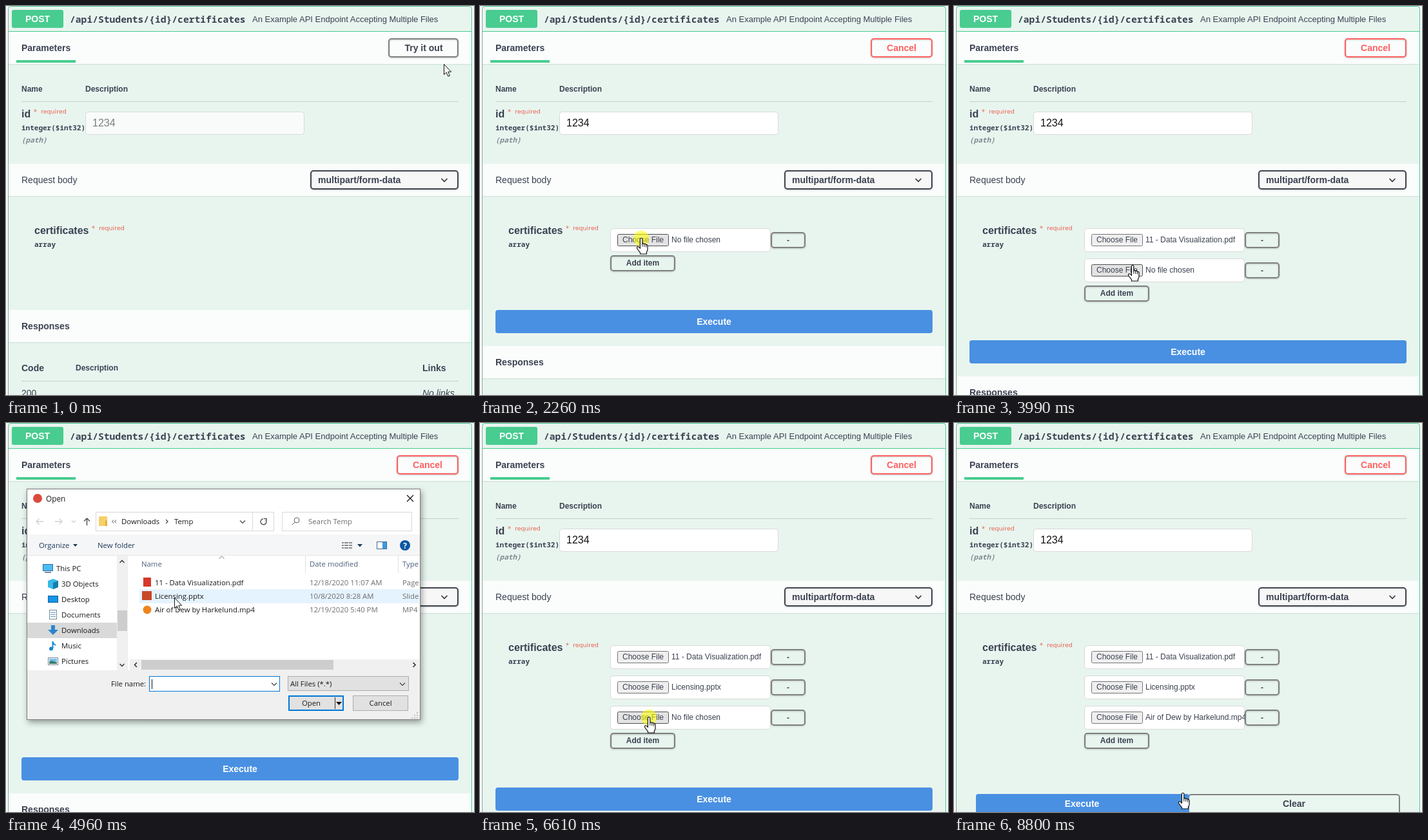
An HTML page that plays this animation: 726x604 px, repeating every 9.12 s.

```html
<!DOCTYPE html>
<html lang="en">
<head>
<meta charset="utf-8">
<title>Uploading several files</title>
<style>
html, body { margin: 0; width: 100%; height: 100%; overflow: hidden; background: #fbfbfb; }
svg { display: block; width: 726px; height: 604px; }
text { font-family: "Liberation Sans", Arial, sans-serif; fill: #3b4151; white-space: pre; }
.b { font-weight: 700; }
.i { font-style: italic; }
.mid { text-anchor: middle; }
.mono { font-family: "Noto Sans Mono", monospace; font-weight: 600; }
.req { font-family: "DejaVu Sans", sans-serif; fill: #e9614f; }
.white { fill: #fff; }
.red { fill: #ff6060; }
#dialog text { font-family: "Open Sans", "Noto Sans", sans-serif; fill: #1a1a1a; }
#dialog text.dim { fill: #6d6d6d; }
#dialog text.head { fill: #4c607a; }
#dialog text.tool { fill: #1e395b; }
.glow { filter: drop-shadow(0 0 2.5px rgba(0,0,0,.45)); }
.soft { filter: drop-shadow(0 1px 1px rgba(0,0,0,.2)); }
</style>
</head>
<body>
<svg viewBox="0 0 726 604" xmlns="http://www.w3.org/2000/svg">
  <g id="page"></g>
  <g id="dialog">
    <g id="frame" style="filter:drop-shadow(2px 4px 5px rgba(0,0,0,.38))"></g>
  </g>
  <circle id="click" r="12.3" fill="#ffff00" opacity=".56"/>
  <g id="arrow">
    <path d="M.5.5V16.5L4.2 13.1 6.9 19.3 9.4 18.2 6.8 12.2H11.6Z" fill="#fff" stroke="#111"/>
  </g>
  <g id="hand">
    <path d="M-1.6 1.2Q-1.6-.5 .1-.5T1.8 1.2V8Q3.6 6.8 4.8 8.6Q6.6 7.6 7.6 9.6Q10 9 10 11.5V17Q10 19.5 8.4 21V24H-1.5V22L-6 16Q-7.2 13.6-5.6 12.8Q-4 12.4-1.6 15Z" fill="#fff" stroke="#111" stroke-width="1.2"/>
    <path d="M1.8 8V12.5M4.8 9V13M7.6 10V13.5" fill="none" stroke="#111"/>
  </g>
</svg>
<script>
const LOOP = 9120;
const FILES = ["11 - Data Visualization.pdf", "Licensing.pptx", "Air of Dew by Harkelund.mp4"];
const $ = id => document.getElementById(id);

// Pointer path: time, x, y
const PATH = [
  [0, 679, 90], [60, 679, 90], [380, 650, 66], [1000, 650, 66], [1400, 225, 350],
  [1700, 225, 350], [2200, 250, 361], [2560, 250, 361], [2960, 280, 263], [3110, 268, 248],
  [3380, 268, 248], [3620, 250, 400], [3780, 250, 400], [3970, 277, 403], [4600, 277, 403],
  [5000, 261, 267], [5680, 261, 267], [6050, 258, 446], [6300, 258, 446], [6560, 262, 457],
  [6780, 262, 457], [7090, 265, 291], [7190, 265, 292], [7520, 265, 292], [8230, 355, 575]
];
const CLICKS = [[450, 600], [1430, 1640], [2260, 2540], [3120, 3360], [3640, 3760], [4310, 4500],
  [5330, 5700], [6070, 6270], [6600, 6720], [7350, 7500], [8350, 8700]];
const DIALOGS = [[2510, 3280], [4470, 5430], [6700, 7350]];
const ADDED = [1660, 3740, 6290];
const PICKED = [3440, 5740, 7560];
const TRIED = 540, SENT = 8520;

const clamp = v => Math.max(0, Math.min(1, v));
const ease = v => v * v * (3 - 2 * v);
const count = (times, t) => times.filter(s => t >= s).length;
const within = (spans, t) => spans.some(([a, b]) => t >= a && t < b);

function text(x, y, str, size, cls = "") {
  return `<text x="${x}" y="${y}" font-size="${size}" class="${cls}">${str}</text>`;
}
function rect(x, y, w, h, fill, more = "") {
  return `<rect x="${x}" y="${y}" width="${w}" height="${h}" fill="${fill}" ${more}/>`;
}
function boxed(x, y, w, h, fill, stroke, sw = 1, r = 0, more = "") {
  return rect(x + sw / 2, y + sw / 2, w - sw, h - sw, fill, `stroke="${stroke}" stroke-width="${sw}" rx="${r}" ${more}`);
}
function line(d, stroke, w = 1) {
  return `<path d="${d}" fill="none" stroke="${stroke}" stroke-width="${w}"/>`;
}
function shape(d, fill) {
  return `<path d="${d}" fill="${fill}"/>`;
}

function pointer(t) {
  let k = 0;
  while (k < PATH.length - 1 && t >= PATH[k + 1][0]) k++;
  const a = PATH[k], b = PATH[k + 1] || a;
  const u = a === b ? 0 : ease((t - a[0]) / (b[0] - a[0]));
  return { x: a[1] + (b[1] - a[1]) * u, y: a[2] + (b[2] - a[2]) * u };
}

// Buttons that can be pointed at: name and rectangle
function targets(s) {
  const list = [["try", s.tried ? 606 : 593, 50, s.tried ? 96 : 109, 30]];
  if (!s.tried) return list;
  list.push(["add", 202, s.rows ? 340 + 47 * s.rows : 340, 101, 25]);
  for (let i = 0; i < s.rows; i++) list.push(["file" + i, 213, 354 + 47 * i, 80, 19]);
  list.push(["run", s.sent ? 34 : 24, s.runY, s.sent ? 329 : 678, 36]);
  return list;
}

function section(y) {
  return rect(4, y, 718, 50, "#fafdfc") + rect(4, y + 50, 718, 1, "#d3e4dc") + rect(4, y + 51, 718, 1, "#e1efe8");
}

function fileRow(i, s) {
  const y = 345 + 47 * i;
  const hot = s.hover === "file" + i;
  return boxed(202, y, 249, 37, "#fff", "#d9d9d9", 1, 4) +
    boxed(213, y + 9, 80, 19, hot ? "#e3e3e3" : "#efefef", hot ? "#4f4f4f" : "#767676", 1, 2) +
    text(221, y + 22, "Choose File", 12, "dark") +
    text(297, y + 22, i < s.picked ? FILES[i] : "No file chosen", 12) +
    boxed(451, y + 6, 54, 25, "none", "#808080", 2, 4, 'class="soft"') +
    text(478, y + 23, "-", 12, "b mid");
}

function page(s) {
  const glow = name => s.hover === name ? 'class="glow"' : 'class="soft"';
  const respY = s.tried ? s.runY + 56 : 472;
  let o = boxed(3, 0, 720, 640, "#e8f5ef", "#49cc90", 1, 4) + line("M3.5 5V604", "#86a99b") +
    rect(4, 39, 718, 1, "#49cc90") + rect(9, 6, 80, 28, "#49cc90", 'rx="3"') +
    text(49, 25, "POST", 14, "b mid white") +
    text(99, 25.5, "/api/Students/{id}/certificates", 14.66, "mono") +
    text(382, 25, "An Example API Endpoint Accepting Multiple Files", 13) +
    section(40) + text(24, 70, "Parameters", 14, "b") + rect(16, 84, 92, 4, "#49cc90");

  o += s.tried
    ? boxed(606, 50, 96, 30, "none", "#ff6060", 2, 4, glow("try")) + text(654, 70, "Cancel", 14, "b mid red")
    : boxed(593, 50, 109, 30, "none", "#808080", 2, 4, glow("try")) + text(648, 70, "Try it out", 14, "b mid");

  o += text(24, 133, "Name", 12, "b") + text(123, 133, "Description", 12, "b") +
    rect(24, 148, 678, 1, "#c5d0cb") +
    text(24, 173, "id", 16, "b") + text(43, 168, "*", 10, "req") + text(54, 167, "required", 9.5, "req") +
    text(24, 193, "integer($int32)", 11, "mono") +
    `<g opacity=".6">${text(24, 212, "(path)", 11, "mono i")}</g>` +
    boxed(123, 164, 340, 36, s.tried ? "#fff" : "#f8fbfa", "#d9d9d9", 1, 4) +
    `<text x="134" y="187" font-size="16" style="fill:${s.tried ? "#111" : "#7d7d7d"}">1234</text>`;

  o += section(245) + text(24, 275, "Request body", 14) +
    boxed(472, 255, 230, 30, "#f7f7f7", "#41444e", 2, 4, 'class="soft"') +
    text(484, 275, "multipart/form-data", 14, "b") + line("M675.5 268L680 272.5 684.5 268", "#333741", 1.7) +
    text(44, 354, "certificates", 16, "b") + text(133, 349, "*", 10, "req") + text(144, 348, "required", 9.5, "req") +
    text(44, 374, "array", 11, "mono");

  if (s.tried) {
    for (let i = 0; i < s.rows; i++) o += fileRow(i, s);
    const addY = 340 + 47 * s.rows;
    o += boxed(202, addY, 101, 25, "none", "#808080", 2, 4, glow("add")) + text(252.5, addY + 16, "Add item", 12, "b mid");
    if (s.sent) {
      o += boxed(363, 576, 329, 40, "#eaf6f0", "#808080", 2, 4) + text(527.5, 596, "Clear", 14, "b mid") +
        rect(34, 576, 331, 40, "#4990e2", 'rx="4"') + text(198.5, 596, "Execute", 14, "b mid white");
    } else {
      o += rect(24, s.runY, 678, 36, "#4990e2", `rx="4" ${s.hover === "run" ? 'class="glow"' : ""}`) +
        text(363, s.runY + 23, "Execute", 14, "b mid white");
    }
  }

  if (!s.sent) {
    o += section(respY) + text(24, respY + 30, "Responses", 14, "b") +
      text(24, respY + 95, "Code", 14, "b") + text(108, respY + 94, "Description", 12, "b") +
      text(646, respY + 95, "Links", 14, "b") + rect(24, respY + 110, 678, 1, "#c5d0cb") +
      text(24, respY + 134, "200", 14) + text(646, respY + 134, "No links", 14, "i");
  }
  return o;
}

function chevron(x, y, w = 4, color = "#444") {
  return line(`M${x - w} ${y - w / 2}l${w} ${w} ${w} ${-w}`, color, 1.2);
}

function sidebar() {
  const names = ["This PC", "3D Objects", "Desktop", "Documents", "Downloads", "Music", "Pictures"];
  const icons = [
    rect(57, 219, 16, 11, "#2c6e9e") + rect(58, 220, 14, 9, "#4cbcf4") + rect(60, 231, 10, 2, "#7c8b96"),
    shape("M65 245L73 242 81 245V255L73 258 65 255Z", "#39b8e6") + shape("M73 248L81 245V255L73 258Z", "#147fae"),
    rect(65, 268, 16, 11, "#0d5f9c") + rect(66, 269, 14, 9, "#1295e8"),
    boxed(67, 290, 12, 15, "#fff", "#7b8a94") + line("M69 294.5h8M69 297.5h8M69 300.5h8", "#5d9cc8"),
    shape("M70 314h6v7h5l-8 8-8-8h5Z", "#2a86cf"),
    line("M72.5 350V339Q73 343 77 345", "#1688d4", 2) + `<circle cx="70" cy="350.500" r="3" fill="#1688d4"/>`,
    boxed(65, 364, 16, 12, "#fff", "#7b8a94") + rect(67, 366, 12, 8, "#77c0ea") + shape("M67 374v-3l4-2 8 3v2Z", "#3d7d6b")
  ];
  return rect(33, 310, 139, 24, "#d9d9d9") +
    names.map((n, i) => icons[i] + text(i ? 86 : 78, 230 + 24 * i, n, 11.35)).join("") +
    rect(172, 206, 17, 178, "#f0f0f0") + rect(173, 291, 15, 32, "#cdcdcd") +
    line("M176.5 217L180 213.500 183.500 217M176.500 374L180 377.500 183.500 374", "#444", 1.6);
}

function fileList() {
  const dates = ["12/18/2020 11:07 AM", "10/8/2020 8:28 AM", "12/19/2020 5:40 PM"];
  const kinds = ["Page", "Slide", "MP4"];
  const marks = [
    rect(213, 240, 12, 14, "#d5382c"), rect(211, 261, 15, 14, "#c8472b"),
    `<circle cx="219" cy="290" r="6.5" fill="#ee8420"/>`
  ];
  let o = rect(207, 237, 434, 22, "#e5f3ff", 'id="rowHover"') +
    text(210, 223, "Name", 11.35, "head") + text(471, 223, "Date modified", 11.35, "head") +
    text(615, 223, "Type", 11.35, "head") + line("M464.5 206V233M608.5 206V233", "#e2e2e2") +
    line("M330.500 210.500L334.500 207 338.500 210.500", "#777");
  FILES.forEach((f, i) => {
    const y = Math.round(251.5 + 21 * i);
    o += marks[i] + text(231, y, f, 11.35) + text(471, y, dates[i], 11.35, "dim") +
      `<svg x="615" y="236" width="27" height="70" viewBox="615 236 27 70" style="width:27px;height:70px">${text(615, y, kinds[i], 11.35, "dim")}</svg>`;
  });
  return o + rect(192, 367, 449, 17, "#f0f0f0") + rect(210, 368, 298, 15, "#cdcdcd") +
    line("M203 372L199.500 375.500 203 379M631.500 372L635 375.500 631.500 379", "#333", 1.6);
}

function dialogBody() {
  let o = boxed(32, 102, 611, 359, "#fff", "#7d7d7d") +
    `<circle cx="49" cy="117" r="7" fill="#db4a3c"/>` + text(62, 122, "Open", 11.8) +
    line("M622 112L632 122M632 112L622 122", "#111", 1.2);

  o += line("M58 153H47M51.500 148.500L47 153 51.500 157.500M76 153H87M82.500 148.500L87 153 82.500 157.500", "#cfcfcf", 1.4) +
    chevron(105, 153, 3, "#cfcfcf") + line("M125.500 159V148M121 152.500L125.500 148 130 152.500", "#555", 1.5) +
    boxed(139, 138, 277, 30, "#fff", "#d9d9d9") + line("M382.500 138V168", "#d9d9d9") +
    rect(144, 145, 13, 15, "#f7d06b") + rect(154, 151, 3, 9, "#e6b13f") +
    line("M167 150.500L164.500 153 167 155.500M171 150.500L168.500 153 171 155.500", "#444") +
    text(179, 157, "Downloads", 11.35) + line("M248 150L251 153 248 156", "#444", 1.2) + text(261, 157, "Temp", 11.35) +
    chevron(367, 153.5) + line("M403 150.500A4.500 4.500 0 1 1 399 148.800M400 148.500H404V152", "#555", 1.4) +
    boxed(428, 138, 202, 30, "#fff", "#d9d9d9") +
    `<circle cx="451" cy="151" r="4" fill="none" stroke="#666"/>` + line("M448 154L443.500 158.500", "#666") +
    text(469, 157, "Search Temp", 11.35, "dim");

  o += rect(33, 173, 609, 33, "#f5f6f7") + rect(33, 205, 609, 1, "#e6e6e6") +
    text(51, 194, "Organize", 11.35, "tool") + shape("M104 188h7l-3.500 4Z", "#1e395b") +
    text(142, 194, "New folder", 11.35, "tool");
  for (let r = 0; r < 3; r++) {
    o += rect(521, 185 + 4 * r, 3, 2, "#7a8da3") + rect(525, 185 + 4 * r, 6, 2, "#8b8b8b") + rect(532, 185 + 4 * r, 5, 2, "#8b8b8b");
  }
  o += shape("M545 188h8l-4 4.500Z", "#1e395b") +
    boxed(575, 184, 16, 12, "#fff", "#446a93") + rect(584, 185, 6, 10, "#3f9ade") +
    `<circle cx="619" cy="190" r="8" fill="#0b57a4"/>` +
    `<text x="619" y="194.500" font-size="12" class="b mid" style="fill:#fff">?</text>`;

  o += sidebar() + fileList();

  o += rect(33, 384, 609, 76, "#f0f0f0") + text(163, 409, "File name:", 11.35) +
    boxed(222, 393, 203, 24, "#fff", "#0078d7") + rect(226, 398, 1, 15, "#111") + chevron(416, 405.5) +
    boxed(437, 393, 188, 23, "#e1e1e1", "#adadad") + text(441, 409, "All Files (*.*)", 11.35) + chevron(615, 405.5) +
    boxed(438, 423, 86, 24, "#e1e1e1", "#0078d7", 2) + line("M510.500 426V444", "#333") +
    shape("M512 433h9l-4.500 5Z", "#111") + text(473.5, 439, "Open", 11.35, "mid") +
    boxed(538, 423, 86, 24, "#e1e1e1", "#adadad") + text(581, 439, "Cancel", 11.35, "mid");
  for (let r = 0; r < 3; r++) {
    for (let c = 0; c <= r; c++) o += rect(637 - 4 * c, 449 + 4 * r, 2, 2, "#bdbdbd");
  }
  return o;
}

// Opacity of the dialog, fading in and out
function dialogLevel(t) {
  for (const [a, b] of DIALOGS) {
    if (t >= a && t < b + 170) return Math.min(ease(clamp((t - a + 30) / 170)), 1 - ease(clamp((t - b) / 170)));
  }
  return 0;
}

$("frame").innerHTML = dialogBody();
let lastKey = "";

function draw(t) {
  const p = pointer(t);
  const s = { tried: t >= TRIED, rows: count(ADDED, t), picked: count(PICKED, t), sent: t >= SENT };
  s.runY = s.sent ? 576 : s.rows ? 425 + 47 * s.rows : 452;
  const level = dialogLevel(t);
  const modal = within(DIALOGS, t);
  const hit = targets(s).find(([, x, y, w, h]) => p.x >= x && p.x <= x + w && p.y >= y - 3 && p.y <= y + h);
  const over = !modal && level === 0 && hit ? hit[0] : "";
  // A file button keeps its hover look until its file arrives
  s.hover = over || (s.rows > s.picked && level > 0 ? "file" + s.picked : "");
  if (t > 5430 && t < PICKED[1]) s.hover = "file1";

  const key = JSON.stringify(s);
  if (key !== lastKey) {
    $("page").innerHTML = page(s);
    lastKey = key;
  }

  const zoom = 0.95 + 0.05 * level;
  $("dialog").setAttribute("display", level > 0 ? "inline" : "none");
  $("dialog").setAttribute("opacity", level);
  $("dialog").setAttribute("transform", `translate(337.5 281.5) scale(${zoom}) translate(-337.5 -281.5)`);
  const row = Math.floor((p.y - 237) / 21);
  $("rowHover").setAttribute("display", row >= 0 && row < 3 ? "inline" : "none");
  $("rowHover").setAttribute("y", 237 + 21 * row);

  const at = `translate(${Math.round(p.x)} ${Math.round(p.y)})`;
  for (const id of ["arrow", "hand", "click"]) $(id).setAttribute("transform", at);
  $("hand").setAttribute("display", over ? "inline" : "none");
  $("arrow").setAttribute("display", over ? "none" : "inline");
  $("click").setAttribute("display", within(CLICKS, t) ? "inline" : "none");
}

const start = performance.now();
function tick() {
  draw((performance.now() - start) % LOOP);
  requestAnimationFrame(tick);
}
tick();
</script>
</body>
</html>
```
